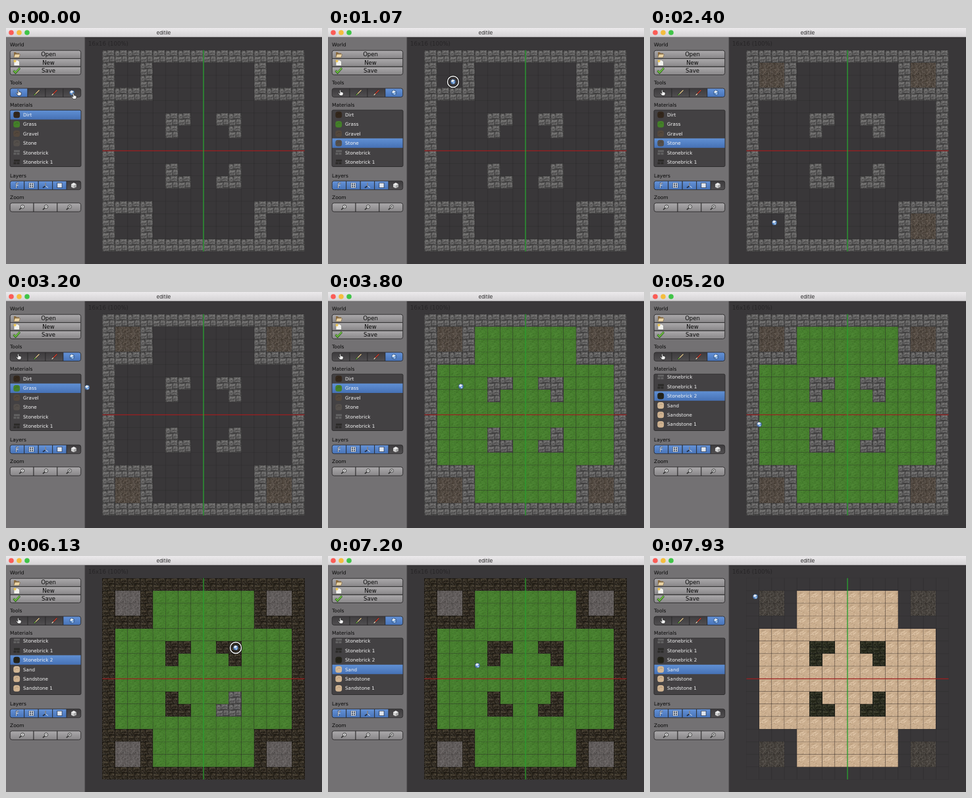
An HTML page with a canvas that plays this animation: 480x360 px, repeating every 8 s.

```html
<!DOCTYPE html>
<html lang="en">
<head>
<meta charset="utf-8">
<title>editile</title>
<style>
  html, body { margin: 0; width: 100%; height: 100%; overflow: hidden; background: #393739; }
  canvas { display: block; width: 480px; height: 360px; }
</style>
</head>
<body>
<canvas id="stage" width="480" height="360"></canvas>
<script>
const ctx = document.getElementById('stage').getContext('2d');
const LOOP = 8000, CELL = 19.2, LEFT = 146.4, TOP = 33.7, SPAN = CELL * 16;
const UI_FONT = '"DejaVu Sans", sans-serif';

function random(seed) {
  return () => {
    seed = (seed * 1664525 + 1013904223) >>> 0;
    return seed / 4294967296;
  };
}

// ---- Tile textures ----
function texture(base, grain, detail, seed) {
  const tile = document.createElement('canvas');
  tile.width = tile.height = 32;
  const g = tile.getContext('2d'), rnd = random(seed);
  g.fillStyle = base;
  g.fillRect(0, 0, 32, 32);
  detail(g, rnd);
  for (let y = 0; y < 32; y += 2)
    for (let x = 0; x < 32; x += 2) {
      g.fillStyle = rnd() < 0.5 ? `rgba(0,0,0,${rnd() * grain})` : `rgba(255,255,255,${rnd() * grain * 0.6})`;
      g.fillRect(x, y, 2, 2);
    }
  return tile;
}

function strokes(dark, light, count, slope) {
  return (g, rnd) => {
    for (let i = 0; i < count; i++) {
      const x = rnd() * 32, y = rnd() * 32, len = 3 + rnd() * 6;
      g.strokeStyle = i % 2 ? dark : light;
      g.lineWidth = 1 + rnd() * 1.5;
      g.beginPath();
      g.moveTo(x, y);
      g.lineTo(x + len, y - len * slope * (0.4 + rnd()));
      g.stroke();
    }
  };
}

function bricks(face, highlight, shade) {
  return (g) => {
    const brick = (x, y, w, h) => {
      g.fillStyle = face;
      g.beginPath();
      g.roundRect(x, y, w, h, 3);
      g.fill();
      g.fillStyle = highlight;
      g.fillRect(x + 2, y + 1, w - 4, 4);
      g.strokeStyle = shade;
      g.lineWidth = 2;
      g.beginPath();
      g.moveTo(x + 2, y + h - 3);
      g.lineTo(x + w * 0.5, y + h * 0.55);
      g.lineTo(x + w - 2, y + h * 0.6);
      g.stroke();
    };
    brick(1, 2, 10, 12);
    brick(13, 1, 17, 12);
    brick(1, 17, 16, 13);
    brick(19, 16, 12, 13);
  };
}

const tiles = {
  brick: texture('#444343', 0.16, bricks('#656464', '#737271', '#504f4f'), 3),
  moss: texture('#241f17', 0.22, bricks('#332c21', '#40382a', '#221d16'), 5),
  darkMoss: texture('#1f2117', 0.18, bricks('#2b2d1e', '#363726', '#1c1f13'), 5),
  stone: texture('#50473f', 0.18, strokes('#40382f', '#62574d', 20, 0.7), 11),
  greyStone: texture('#605b5a', 0.14, strokes('#524d4c', '#6d6867', 20, 0.7), 11),
  darkStone: texture('#45403b', 0.16, strokes('#37322e', '#544e48', 20, 0.7), 11),
  grass: texture('#467f2d', 0.06, strokes('#407529', '#4d8833', 20, 0.6), 17),
  sand: texture('#cdb090', 0.05, strokes('#b99b7b', '#e1c7a9', 18, 0.6), 23)
};

// ---- Timeline ----
// Cursor path: time, x, y
const path = [
  [0, 102, 103], [150, 102, 103], [500, 36, 176], [620, 36, 176],
  [1000, 190, 82], [1160, 190, 82], [1480, 415, 74], [1580, 415, 74],
  [1880, 414, 300], [2010, 414, 300], [2390, 189, 297], [2540, 189, 297],
  [2900, 36, 147], [3020, 36, 147], [3400, 224, 144], [3600, 224, 144],
  [3800, 202, 144], [4080, 40, 176], [4580, 40, 160], [4760, 40, 160],
  [5200, 166, 202], [5300, 156, 206], [5400, 156, 206], [5560, 252, 217],
  [5660, 252, 217], [5800, 252, 140], [5900, 252, 140], [6060, 349, 140],
  [6160, 349, 140], [6320, 349, 234], [6420, 349, 234], [6780, 38, 173],
  [6900, 38, 173], [7200, 227, 167], [7400, 227, 167], [7800, 160, 62], [8000, 160, 62]
];
const PICK_TOOL = 130, ERASE = 7900;
const roomFills = [1130, 1540, 2500, 1970];   // top left, top right, bottom left, bottom right
const innerFills = [5860, 6120, 5620, 6380];
const GRASS = 3540, OUTER = 5360, SAND = 7350;
const picks = [[0, 0], [580, 3], [2970, 1], [4700, 6], [6850, 7]];
const clicks = [PICK_TOOL, GRASS, OUTER, SAND, ...roomFills, ...innerFills, ...picks.slice(1).map(p => p[0])];

const ease = u => u * u * (3 - 2 * u);

function cursorAt(t) {
  const i = Math.max(1, path.findIndex(p => p[0] > t));
  const [t0, x0, y0] = path[i - 1], [t1, x1, y1] = path[i];
  const u = ease((t - t0) / (t1 - t0));
  return [x0 + (x1 - x0) * u, y0 + (y1 - y0) * u];
}

function tileAt(col, row, t) {
  const m = Math.min(col, 15 - col), n = Math.min(row, 15 - row);
  const corner = (col > 7 ? 1 : 0) + (row > 7 ? 2 : 0);
  if (m === 0 || n === 0 || Math.max(m, n) === 3)
    return t >= ERASE ? null : t >= OUTER ? 'moss' : 'brick';
  if (m < 3 && n < 3)
    return t < roomFills[corner] ? null : t >= SAND ? 'darkStone' : t >= OUTER ? 'greyStone' : 'stone';
  if (m >= 5 && n >= 5 && m + n < 12)
    return t < innerFills[corner] ? 'brick' : t >= SAND ? 'darkMoss' : 'moss';
  return t >= SAND ? 'sand' : t >= GRASS ? 'grass' : null;
}

// ---- Drawing helpers ----
function rect(x, y, w, h, fill) {
  ctx.fillStyle = fill;
  ctx.fillRect(x, y, w, h);
}

function text(str, x, y, size, color, align = 'left', font = UI_FONT) {
  ctx.font = `${size}px ${font}`;
  ctx.textAlign = align;
  ctx.textBaseline = 'alphabetic';
  ctx.fillStyle = color;
  ctx.fillText(str, x, y);
}

function shape(points, fill, stroke, width = 0.8) {
  ctx.beginPath();
  points.forEach(([x, y], i) => i ? ctx.lineTo(x, y) : ctx.moveTo(x, y));
  if (fill) { ctx.closePath(); ctx.fillStyle = fill; ctx.fill(); }
  if (stroke) { ctx.strokeStyle = stroke; ctx.lineWidth = width; ctx.stroke(); }
}

function circle(x, y, r, fill, stroke, width = 1) {
  ctx.beginPath();
  ctx.arc(x, y, r, 0, Math.PI * 2);
  if (fill) { ctx.fillStyle = fill; ctx.fill(); }
  if (stroke) { ctx.strokeStyle = stroke; ctx.lineWidth = width; ctx.stroke(); }
}

function roundBox(x, y, w, h, radii, fill, stroke) {
  ctx.beginPath();
  ctx.roundRect(x, y, w, h, radii);
  if (fill) { ctx.fillStyle = fill; ctx.fill(); }
  if (stroke) { ctx.strokeStyle = stroke; ctx.lineWidth = 0.9; ctx.stroke(); }
}

function vertical(y, h, from, to) {
  const g = ctx.createLinearGradient(0, y, 0, y + h);
  g.addColorStop(0, from);
  g.addColorStop(1, to);
  return g;
}

const BUTTON = { plain: ['#acaaac', '#888688'], on: ['#6593d8', '#4773b8'], off: ['#3d3b3d', '#514f51'] };

function button(x, y, w, h, state, radii = 0) {
  roundBox(x, y, w, h, radii, vertical(y, h, ...BUTTON[state]), '#2d2c2d');
}

function buttonRow(y, count, stateOf, icon) {
  const w = 107.5 / count;
  for (let i = 0; i < count; i++) {
    const left = i ? 0 : 3, right = i < count - 1 ? 0 : 3;
    button(6.2 + i * w, y, w, 13.4, stateOf(i), [left, right, right, left]);
    icon(i, 6.2 + (i + 0.5) * w, y + 6.7);
  }
}

function hand(x, y) {
  shape([[x - 2, y - 4.5], [x - 0.5, y - 4.5], [x, y - 1.3], [x + 3.4, y - 0.5], [x + 3.6, y + 2],
    [x + 2.6, y + 4.4], [x - 1.5, y + 4.4], [x - 4, y + 0.8], [x - 3.2, y], [x - 1.6, y + 1.3]], '#f4f4f4');
  ctx.lineWidth = 0.7;
  ctx.strokeStyle = '#222';
  ctx.closePath();
  ctx.stroke();
}

function brush(x, y, handle, tip) {
  shape([[x - 4, y + 4], [x + 4, y - 4]], null, '#252325', 2.4);
  shape([[x - 1.5, y + 1.5], [x + 4, y - 4]], null, handle, 1.4);
  shape([[x - 3.8, y + 3.8], [x - 1.5, y + 1.5]], null, tip, 1.3);
}

function ball(x, y) {
  circle(x, y, 3.7, '#5b8bc9', '#334764', 0.6);
  shape([[x - 3.3, y - 0.8], [x - 1, y - 3.4], [x + 2.6, y - 2], [x - 0.5, y + 0.8]], '#e6ebf0');
  circle(x + 1, y + 1.8, 1.2, '#a9c9ef');
}

function magnifier(i, x, y) {
  shape([[x - 4, y + 3.5], [x - 0.5, y + 0.5]], null, '#333', 1.6);
  circle(x + 1, y - 1, 2.7, '#eee', '#333', 0.9);
  if (i) shape([[x - 0.4, y - 1], [x + 2.4, y - 1]], null, '#333', 0.8);
  if (i !== 1) shape([[x + 1, y - 2.4], [x + 1, y + 0.4]], null, '#333', 0.8);
}

function layerIcon(i, x, y) {
  const white = '#eef1f5', dark = '#26344c';
  if (i === 0) {
    shape([[x + 2.4, y - 3.4], [x - 1, y - 3.2], [x - 1.4, y + 4]], null, dark, 2.2);
    shape([[x + 2.4, y - 3.4], [x - 1, y - 3.2], [x - 1.4, y + 4]], null, white, 1);
    shape([[x - 1, y], [x + 1.6, y - 0.3]], null, white, 1);
  } else if (i === 1) {
    rect(x - 4, y - 4, 8, 8, dark);
    for (let k = -3; k <= 3; k += 3) {
      shape([[x + k, y - 3.5], [x + k, y + 3.5]], null, white, 1);
      shape([[x - 3.5, y + k], [x + 3.5, y + k]], null, white, 1);
    }
  } else if (i === 2) {
    shape([[x, y - 4], [x, y + 1], [x - 4, y + 3.8]], null, dark, 1.8);
    shape([[x, y - 4], [x, y + 1], [x + 4, y + 3.5]], null, white, 0.8);
  } else if (i === 3) {
    rect(x - 4, y - 4, 8, 8, dark);
    rect(x - 3.3, y - 3.3, 6.6, 6.6, '#dfe5ee');
  } else {
    shape([[x, y - 4], [x + 3.7, y - 2], [x + 3.7, y + 2.4], [x, y + 4.2], [x - 3.7, y + 2.4], [x - 3.7, y - 2]], '#f0f0f0');
    shape([[x, y], [x + 3.7, y - 2], [x + 3.7, y + 2.4], [x, y + 4.2]], '#a9a9a9');
    shape([[x, y], [x - 3.7, y - 2], [x - 3.7, y + 2.4], [x, y + 4.2]], '#d0d0d0');
  }
}

// ---- Window parts ----
function drawTitle() {
  rect(0, 0, 480, 14, vertical(0, 14, '#eceaec', '#d4d2d4'));
  rect(0, 13.3, 480, 0.7, '#aaa8aa');
  ['#fb5c56', '#f5bd3d', '#3fc447'].forEach((c, i) => circle(8 + i * 12, 7, 3.8, c));
  text('editile', 239.5, 9.9, 7.6, '#2c2a2c', 'center', 'Inter, sans-serif');
}

function drawMaterials(t) {
  const names = ['Dirt', 'Grass', 'Gravel', 'Stone', 'Stonebrick', 'Stonebrick 1', 'Stonebrick 2', 'Sand', 'Sandstone', 'Sandstone 1'];
  const colors = ['#33271c', '#448029', '#54483d', '#544f4b', '#626262', '#2b2a28', '#24231a', '#d3b896', '#d0b391', '#d0b391'];
  const selected = picks.filter(p => p[0] <= t).pop()[1];
  const scroll = 60.2 * ease(Math.min(1, Math.max(0, (t - 4100) / 400)));
  ctx.save();
  roundBox(6, 125.2, 108, 86.3, 2, '#434143');
  ctx.clip();
  names.forEach((name, i) => {
    const y = 125.2 + i * 14.4 - scroll;
    if (y < 110 || y > 212) return;
    if (i === selected) rect(6, y, 108, 14.4, vertical(y, 14.4, '#6090d4', '#4671b5'));
    if (i > 3 && i < 6) {
      rect(12, y + 3.5, 9, 3, colors[i]);
      rect(11.5, y + 7.5, 4, 3, colors[i]);
      rect(16.5, y + 7.5, 4, 3, colors[i]);
    } else {
      roundBox(11.3, y + 2.3, 9.8, 9.8, 3.5, colors[i]);
      shape([[13, y + 8], [16, y + 5], [19, y + 6]], null, 'rgba(0,0,0,.15)', 1);
    }
    text(name, 26, y + 9.7, 7.2, '#f4f4f4');
  });
  ctx.restore();
  roundBox(6, 125.2, 108, 86.3, 2, null, '#2b2a2b');
}

function drawSidebar(t) {
  rect(0, 14, 120, 346, '#737173');
  rect(119.4, 14, 0.8, 346, '#545254');
  [['World', 28], ['Tools', 86.2], ['Materials', 119.7], ['Layers', 228], ['Zoom', 261.3]]
    .forEach(([label, y]) => text(label, 6, y, 7.5, '#080808'));

  ['Open', 'New', 'Save'].forEach((label, i) => {
    const y = 34.2 + i * 12.5;
    button(6.2, y, 107.5, 12.3, 'plain', [[3, 3, 0, 0], 0, [0, 0, 3, 3]][i]);
    text(label, 64.5, y + 9, 8.5, '#080808', 'center');
  });
  shape([[12, 37], [15, 37], [16, 38.5], [20, 38.5], [20, 45], [12, 45]], '#8a6b40');
  shape([[13.5, 40], [21.5, 40], [19.8, 45], [11.8, 45]], '#ecd5a6', '#634d30', 0.5);
  shape([[12, 49], [18, 49], [20.5, 51.5], [20.5, 57.5], [12, 57.5]], '#f2f2ee', '#666', 0.5);
  circle(13.5, 50.5, 2, '#edc75a');
  shape([[11.5, 65], [14.5, 68.5], [21, 61]], null, '#245817', 2.7);
  shape([[11.8, 65.3], [14.5, 68], [20.7, 61.3]], null, '#79cf43', 1.5);

  const tool = t < PICK_TOOL ? 0 : 3;
  buttonRow(92, 4, i => i === tool ? 'on' : 'off', (i, x, y) => {
    if (i === 0) hand(x, y);
    else if (i === 3) ball(x, y);
    else if (i === 1) brush(x, y, '#e0c48c', '#6fb046');
    else brush(x, y, '#d2402e', '#e8dcc0');
  });
  drawMaterials(t);
  buttonRow(233.3, 5, i => i < 4 ? 'on' : 'off', layerIcon);
  buttonRow(266.9, 3, () => 'plain', magnifier);
}

function drawWorld(t) {
  rect(120, 14, 360, 346, '#393739');
  text('16x16 (100%)', 125, 26.6, 8.6, '#272527');
  const gridColors = { grass: 'rgba(40,35,40,.42)', sand: 'rgba(35,28,25,.42)' };
  for (let row = 0; row < 16; row++)
    for (let col = 0; col < 16; col++) {
      const name = tileAt(col, row, t), x = LEFT + col * CELL, y = TOP + row * CELL;
      if (name) ctx.drawImage(tiles[name], x, y, CELL, CELL);
      ctx.strokeStyle = gridColors[name] || 'rgba(0,0,0,.08)';
      ctx.lineWidth = 0.6;
      ctx.strokeRect(x, y, CELL, CELL);
    }
  rect(LEFT, 186.7, SPAN, 1.2, '#a01f20');
  rect(299.4, TOP, 1.2, SPAN, '#2aae32');
}

function drawCursor(t) {
  const [x, y] = cursorAt(t);
  if (clicks.some(c => t >= c - 80 && t < c + 40)) {
    circle(x, y, 8.5, null, '#111', 3);
    circle(x, y, 8.5, null, '#fff', 1.4);
  }
  if (x < 120) hand(x + 1.5, y + 1);
  else ball(x, y);
}

function frame(now) {
  const t = now % LOOP;
  drawWorld(t);
  drawSidebar(t);
  drawTitle();
  drawCursor(t);
  requestAnimationFrame(frame);
}
requestAnimationFrame(frame);
</script>
</body>
</html>
```
